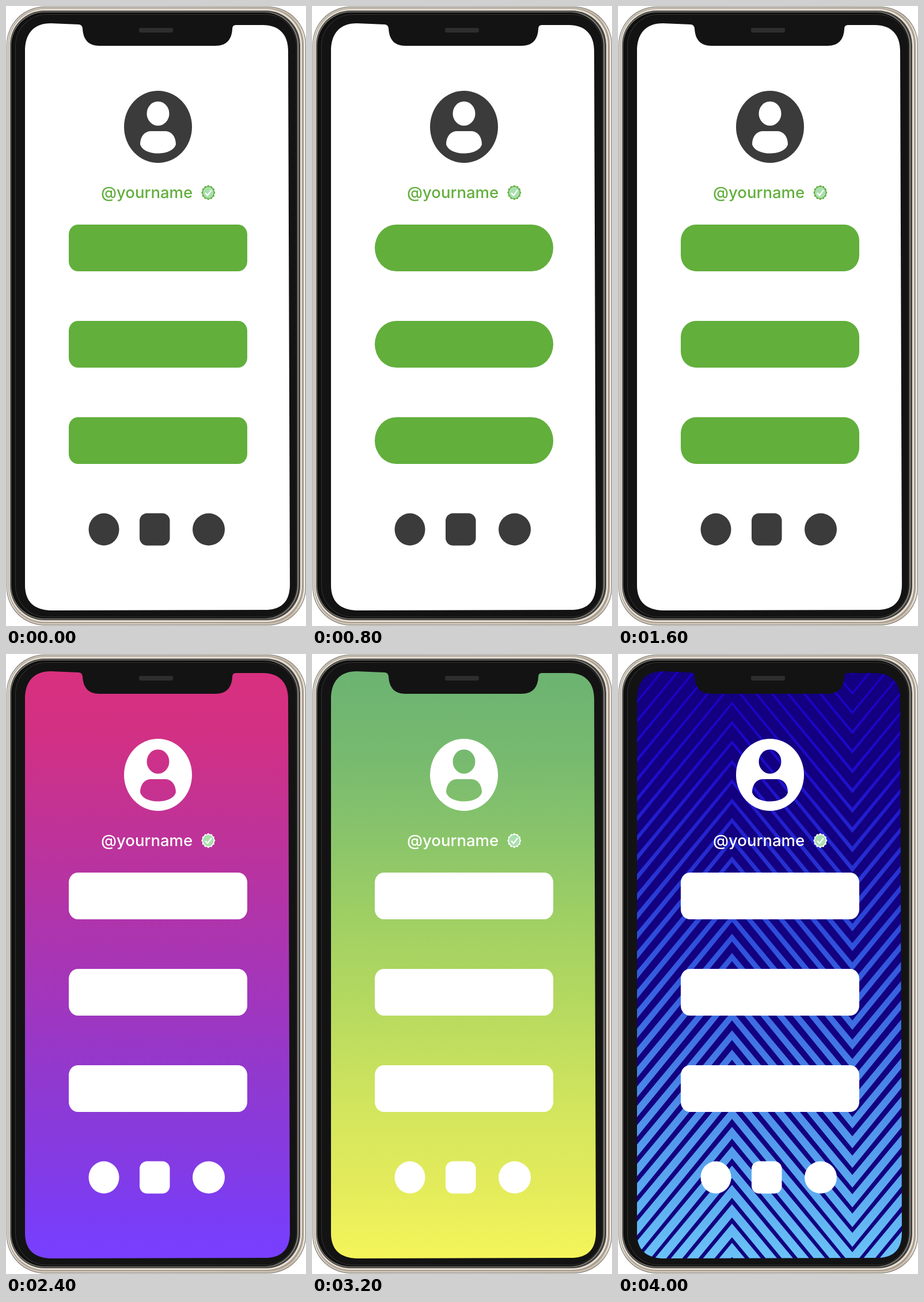
Animation of 521x1075 px, one loop 4.8 s. Source, as an HTML page:

```html
<!DOCTYPE html>
<html lang="en">
<head>
<meta charset="utf-8">
<title>Profile page themes</title>
<style>
  html, body { margin: 0; width: 100%; height: 100%; overflow: hidden; background: #fff; }
  svg { display: block; width: 100%; height: 100%; }
  text { font: 500 27.5px Inter, "Open Sans", sans-serif; }
</style>
</head>
<body>
<svg id="stage" viewBox="0 0 521 1075" preserveAspectRatio="none">
  <defs>
    <linearGradient id="metal" x1="0" x2="1" y1="0" y2="0">
      <stop offset="0" stop-color="#e6e4e0"/>
      <stop offset=".04" stop-color="#cfc6ba"/>
      <stop offset=".5" stop-color="#d2cac0"/>
      <stop offset=".96" stop-color="#c9beb0"/>
      <stop offset="1" stop-color="#eceae6"/>
    </linearGradient>
    <clipPath id="screen">
      <path d="M33 78C33 48 48 30 78 30L126 32Q132 32 133 39C134 58 143 69 162 69H364C383 69 392 58 393 40Q393 33 399 33L446 33C474 33 490 49 490 78L493 1003C493 1032 479 1047 450 1047L81 1048C50 1048 33 1034 33 1004Z"/>
    </clipPath>
  </defs>
  <g id="shell"></g>
  <rect x="231" y="38" width="59" height="8" rx="3" fill="#2e2e2e"/>
  <g id="backdrop" clip-path="url(#screen)"></g>
  <path id="avatar" fill-rule="evenodd" d="M205 209.5a59 62.5 0 1 1 118 0a59 62.5 0 1 1-118 0ZM244.500 186.500a19.500 21 0 1 0 39 0a19.500 21 0 1 0-39 0ZM250 217H278C288 218 295 227 295 240C292 250 279 255.500 264 255.500S236 250 233 240C233 227 240 218 250 217Z"/>
  <text id="handle" x="165" y="333">@yourname</text>
  <g id="badge">
    <path id="seal"/>
    <ellipse cx="351.300" cy="323.500" rx="9.300" ry="9.900" fill="#a9dfae"/>
    <path d="M346 324L350 328.500L357 319" fill="none" stroke="#fff" stroke-width="2.200"/>
  </g>
  <g id="bars"></g>
  <g id="links">
    <ellipse cx="170" cy="907.500" rx="26.500" ry="28"/>
    <rect x="232" y="879.500" width="52.500" height="56" rx="13"/>
    <ellipse cx="352" cy="907.500" rx="28" ry="28"/>
  </g>
</svg>
<script>
const HOLD = 800;
const GREEN = "#62af3c", DARK = "#3b3b3b", WHITE = "#fff";
const byId = id => document.getElementById(id);

function add(parent, tag, attrs) {
  const node = document.createElementNS("http://www.w3.org/2000/svg", tag);
  for (const key in attrs) node.setAttribute(key, attrs[key]);
  return parent.appendChild(node);
}

const roundRect = (parent, x, y, right, bottom, rx, ry, fill) =>
  add(parent, "rect", { x, y, width: right - x, height: bottom - y, rx, ry, fill });

function gradient(id, stops) {
  const node = add(document.querySelector("defs"), "linearGradient",
    { id, gradientUnits: "userSpaceOnUse", x1: 0, x2: 0, y1: 30, y2: 1048 });
  for (const [y, color] of stops)
    add(node, "stop", { offset: (y - 30) / 1018, "stop-color": color });
  return `url(#${id})`;
}

// Nested outlines of the phone body, from the rim inwards
[
  [1, 1, 521, 1074, 66, "#77736d"],
  [2, 2, 520, 1073, 65, "url(#metal)"],
  [4, 4, 517, 1070, 63, "#a99b89"],
  [5, 5, 514, 1068, 62, "#e4dfd7"],
  [7, 8, 511, 1065, 60, "#45413c"],
  [8, 10, 508, 1063, 59, "#8a8780"],
  [9, 11, 506, 1062, 58, "#101010"],
  [16, 14, 505, 1060, 55, "#333"],
  [17, 15, 504, 1059, 54, "#131313"]
].forEach(([x, y, right, bottom, r, fill]) => roundRect(byId("shell"), x, y, right, bottom, r, r, fill));

const sunset = gradient("sunset", [
  [30, "#d8307f"], [130, "#d33083"], [250, "#c53291"], [450, "#b034aa"],
  [600, "#a136bd"], [750, "#8f39d1"], [900, "#823be6"], [970, "#7b3df4"], [1048, "#783fff"]
]);
const meadow = gradient("meadow", [
  [30, "#6cb372"], [180, "#77ba6f"], [300, "#87c36b"], [450, "#9ecf64"],
  [620, "#b7da5f"], [800, "#d4e65d"], [920, "#e3eb5b"], [1048, "#f5f55a"]
]);
const ocean = gradient("ocean", [
  [30, "#1a00c8"], [200, "#1d0bcb"], [330, "#2428cf"], [500, "#2f50dc"],
  [650, "#3f70e3"], [800, "#4f90ea"], [930, "#5baaf0"], [1048, "#6ac2f6"]
]);

const backdrop = byId("backdrop");
const fill = add(backdrop, "rect", { x: 30, y: 26, width: 466, height: 1026 });

// Zigzag stripes grow thicker towards the bottom
const stripes = add(backdrop, "g", { fill: ocean });
const PITCH = 33.5, SLOPE = 1.2, PEAK = 198, VALLEY = 407, LAST_TIP = 1021;
for (let k = -2; k < 40; k++) {
  const tip = LAST_TIP - k * PITCH;
  const edge = [[30, PEAK - 30], [PEAK, 0], [VALLEY, VALLEY - PEAK], [496, 2 * VALLEY - PEAK - 496]]
    .map(([x, run]) => [x, tip + run * SLOPE]);
  const lower = edge.map(([x, y]) =>
    [x, y + 4 + 21 * Math.min(1, Math.max(0, (y - 30) / 1018))]);
  add(stripes, "polygon", { points: [...edge, ...lower.reverse()].join(" ") });
}

const sealPoints = Array.from({ length: 96 }, (_, i) => {
  const a = i / 96 * 2 * Math.PI, r = 11.3 + 0.7 * Math.cos(12 * a);
  return `${351.3 + r * Math.cos(a)} ${323.5 + 1.06 * r * Math.sin(a)}`;
});
byId("seal").setAttribute("d", `M${sealPoints.join("L")}Z`);

const bars = [379, 546, 713].map(y => roundRect(byId("bars"), 109, y, 419, y + 81, 0, 0));

const plain = rx => ({ back: WHITE, accent: GREEN, icon: DARK, rx });
const vivid = (back, striped = false) => ({ back, accent: WHITE, icon: WHITE, rx: 16, striped });
const themes = [plain(16), plain(37.5), plain(26), vivid(sunset), vivid(meadow), vivid("#130080", true)];

function draw(time) {
  const { back, accent, icon, rx, striped } = themes[Math.floor(time / HOLD) % themes.length];
  fill.setAttribute("fill", back);
  stripes.setAttribute("visibility", striped ? "visible" : "hidden");
  for (const id of ["handle", "seal", "bars"]) byId(id).setAttribute("fill", accent);
  for (const id of ["avatar", "links"]) byId(id).setAttribute("fill", icon);
  for (const bar of bars) {
    bar.setAttribute("rx", rx);
    bar.setAttribute("ry", rx * 1.08);
  }
}

const start = performance.now();
function tick() {
  draw(performance.now() - start);
  requestAnimationFrame(tick);
}
tick();
</script>
</body>
</html>
```
